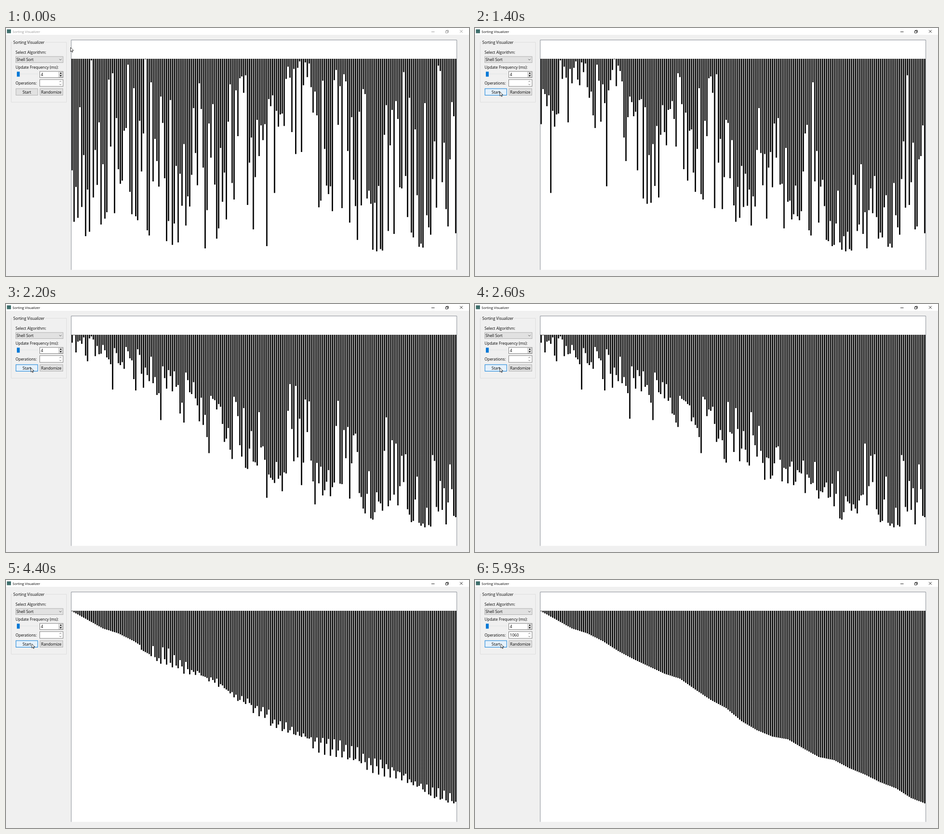
An HTML page that plays this animation: 1022x548 px, repeating every 6990 ms.

```html
<!DOCTYPE html>
<html lang="en">
<head>
<meta charset="utf-8">
<title>Sorting Visualizer</title>
<style>
  html, body { margin: 0; width: 100%; height: 100%; overflow: hidden; background: #f0f0f0; }
  svg { display: block; }
  text { font: 8.6px "Open Sans", "Noto Sans", sans-serif; fill: #000; }
  .face { fill: #e1e1e1; stroke: #adadad; }
  .field { fill: #fff; stroke: #7a7a7a; }
  .line { fill: none; stroke: #333; stroke-width: .8; }
  .hover { fill: #e5f1fb; stroke: #0078d7; }
  .mid { text-anchor: middle; }
</style>
</head>
<body>
<svg width="1022" height="548">
  <rect width="1022" height="548" fill="#f0f0f0"/>
  <rect width="1022" height="15" fill="#fff"/>
  <rect x="2" y="3" width="9" height="8.5" fill="#3f6f6c"/>
  <text id="title" x="14.5" y="10.7" style="font-size:7.6px">Sorting Visualizer</text>
  <path id="controls" fill="none" stroke-width=".9"
    d="M939 8.5h7M970.5 6.5h4.5v4.5h-4.5zM972 6.5v-1.5h4.5v4.5h-1.5M1002 4.5l6 6m0-6l-6 6"/>

  <path d="M14 31.5H11.5V164H133.5V31.5H87" fill="none" stroke="#dcdcdc"/>
  <text x="16" y="35">Sorting Visualizer</text>
  <text x="21" y="56.5">Select Algorithm:</text>
  <rect class="face" x="21.5" y="63" width="104.5" height="13.5"/>
  <text x="23" y="73">Shell Sort</text>
  <path class="line" d="M117.5 68.5l2.5 2.5l2.5-2.5"/>

  <text x="21" y="89.5">Update Frequency (ms):</text>
  <rect x="22" y="100.5" width="49" height="2" fill="#e7eaea"/>
  <rect x="24" y="96.5" width="6.3" height="11" fill="#0078d7"/>
  <rect class="field" x="74.5" y="96" width="51.5" height="13.5"/>
  <path class="face" stroke-width=".7" d="M116.5 97h8.5v11.5h-8.5zv5.7h8.5"/>
  <path d="M118.3 101.3l2.4-3l2.4 3zm0 3l2.4 3l2.4-3z"/>
  <text x="77" y="106">4</text>

  <text x="21" y="125">Operations:</text>
  <rect class="field" x="74.5" y="114" width="51.5" height="15"/>
  <path class="line" d="M118 119.3l2-2l2 2m-4 4.4l2 2l2-2"/>
  <text id="count" x="77" y="125"></text>

  <rect id="start" class="face" x="22" y="134" width="48" height="14.5"/>
  <text class="mid" x="46" y="144.5">Start</text>
  <rect class="face" x="75" y="134" width="50.5" height="14.5"/>
  <text class="mid" x="100" y="144.5">Randomize</text>

  <path d="M144 534.5V26.5H995V534.5" fill="#fff" stroke="#828790"/>
  <path id="bars" fill="none" stroke="#000" stroke-width="2.9"/>
  <path id="cursor" d="M0 0V9.3L2.2 7.3L3.7 10.6L5 10L3.6 6.8H6.7Z" fill="#fff" stroke="#000" stroke-width=".8"/>
</svg>
<script>
const LOOP = 6990, STEP = 200 / 3, SORT_START = 1000, SORT_END = 5900;
const COUNT = 200, TOP = 68, PITCH = 4.255;
const el = id => document.getElementById(id);

// Bottom edge of every eighth bar once sorted.
const sortedCurve = [
  69, 88, 107, 118, 135, 157, 175, 191, 207, 218, 242, 265, 283,
  312, 332, 346, 352, 372, 391, 398, 416, 430, 447, 460, 482, 495];

// The first shuffled bars; the rest scatter around a rough outline.
const opening = [
  315, 429, 351, 419, 175, 395, 280, 460, 358, 450, 72, 375, 269, 347, 208, 435, 300, 420, 406, 114,
  263, 101, 408, 200, 313, 344, 337, 226, 220, 80, 362, 410, 133, 416, 424, 206, 315, 233, 70, 447];
const outline = [300, 300, 330, 320, 260, 250, 380, 250, 190, 260, 250, 320, 420, 240, 380, 240, 300];

function sample(points, spacing, i) {
  const p = i / spacing, k = Math.floor(p);
  return points[k] + (points[k + 1] - points[k]) * (p - k);
}

function noise(i) {
  const v = Math.sin(i * 12.9898) * 43758.5453;
  return v - Math.floor(v) - 0.5;
}

function initialBars() {
  const pool = Array.from({ length: COUNT }, (_, i) => sample(sortedCurve, 8, i));
  const bars = opening.map(y => {
    let best = 0;
    pool.forEach((v, k) => { if (Math.abs(v - y) < Math.abs(pool[best] - y)) best = k; });
    return pool.splice(best, 1)[0];
  });
  pool.map((_, i) => ({ i, key: sample(outline, 10, i) + 320 * noise(i + 1) }))
    .sort((a, b) => a.key - b.key)
    .forEach(({ i }, rank) => { bars[opening.length + i] = pool[rank]; });
  return bars;
}

function swap(a, i, j) {
  [a[i], a[j]] = [a[j], a[i]];
}

function shellSwaps(bars) {
  const a = bars.slice(), swaps = [];
  for (let gap = COUNT >> 1; gap; gap >>= 1)
    for (let i = gap; i < COUNT; i++)
      for (let j = i; j >= gap && a[j - gap] > a[j]; j -= gap) {
        swap(a, j, j - gap);
        swaps.push([j, j - gap]);
      }
  return swaps;
}

const initial = initialBars(), swaps = shellSwaps(initial);
const clamp = v => Math.min(1, Math.max(0, v));

function draw(time) {
  // The screen refreshes fifteen times a second.
  const t = Math.floor((time + 4) / STEP) * STEP;
  const bars = initial.slice();
  const done = Math.round(swaps.length * clamp((t - SORT_START) / (SORT_END - SORT_START)));
  for (let n = 0; n < done; n++) swap(bars, ...swaps[n]);
  el("bars").setAttribute("d", bars.map((y, i) =>
    `M${(146 + i * PITCH).toFixed(2)} ${TOP}V${y.toFixed(1)}`).join(""));

  const active = t > 990;
  el("title").style.fill = active ? "#000" : "#999";
  el("controls").setAttribute("stroke", active ? "#000" : "#888");
  el("count").textContent = t > 5920 ? "1060" : "";

  const p = clamp(t / 467), ease = p * p * (3 - 2 * p);
  const x = 142.5 - 87.5 * ease + (t > 2860 ? 2 : 0), y = 43 + 98 * ease;
  el("cursor").setAttribute("transform", `translate(${x} ${y})`);
  el("start").setAttribute("class", x < 70 && y > 134 ? "hover" : "face");
}

const began = performance.now();
function tick() {
  draw((performance.now() - began) % LOOP);
  requestAnimationFrame(tick);
}
tick();
</script>
</body>
</html>
```
